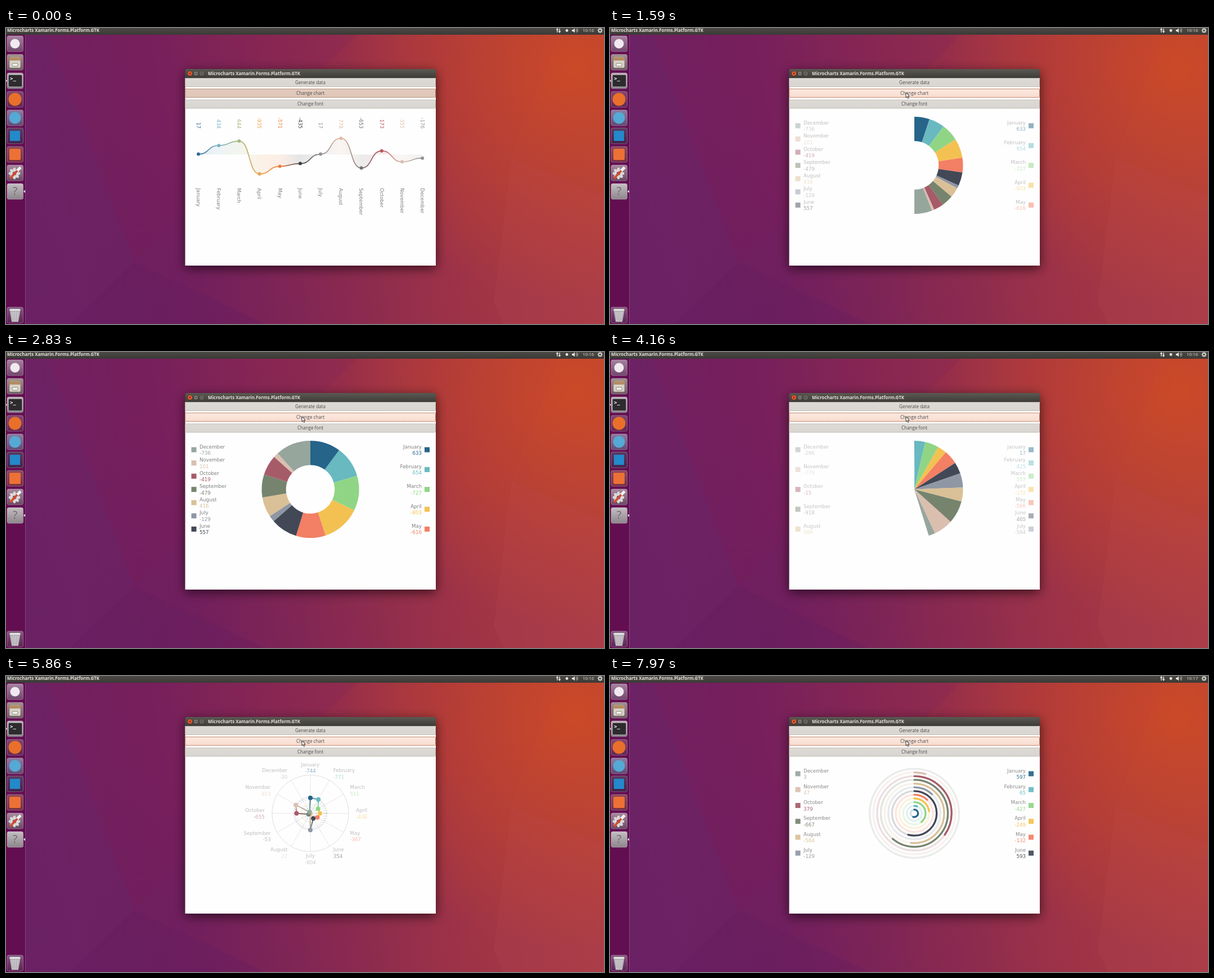
An HTML page with a canvas for the animation above (8 s loop, 1063 px wide and 527 px high).

```html
<!DOCTYPE html>
<html lang="en">
<head>
<meta charset="utf-8">
<title>Microcharts</title>
<style>
html, body { margin: 0; width: 100%; height: 100%; overflow: hidden; background: #6b1f5c; }
canvas { display: block; }
</style>
</head>
<body>
<canvas id="stage" width="1063" height="527"></canvas>
<script>
const W = 1063, H = 527, LOOP = 8000, TAU = Math.PI * 2;
const CX = 541, CY = 244.5, BAR = 12;
const UI = '"Open Sans", "Noto Sans", sans-serif';
const CHART_FONT = '8.7px "DejaVu Sans", sans-serif';
const MONTHS = ['January', 'February', 'March', 'April', 'May', 'June', 'July',
  'August', 'September', 'October', 'November', 'December'];
const COLORS = ['#266489', '#68b9c0', '#90d585', '#f3c151', '#f37f64', '#424856',
  '#8f97a4', '#dac096', '#76846e', '#a65b69', '#dabfaf', '#97a69d'];
const LINE_COLORS = ['#2c6a9c', '#7fb3c4', '#a6b881', '#e9a14c', '#ef7f42', '#3d3d44',
  '#929298', '#e1b9a2', '#707070', '#bc5660', '#d9bfb0', '#919498'];
const GREY = '#7e7e7e';

const CHARTS = [
  { start: -9999, draw: drawLine, values: [17, 434, 644, -935, -571, -435, 17, 778, -653, 173, -355, -176] },
  { start: 1294, draw: drawPie, hole: 43.3, right: 5, values: [633, 654, -727, -803, -616, 557, -129, 416, -479, -419, 101, -736] },
  { start: 3879, draw: drawPie, hole: 0, right: 7, values: [17, 425, 557, -372, -566, 465, -584, 566, -918, -15, -779, -266] },
  { start: 5560, draw: drawRadar, values: [-744, -771, 511, -438, -367, 354, -804, 27, -53, -655, 913, -30] },
  { start: 7120, draw: drawGauge, right: 6, values: [597, 65, -427, -249, -132, 593, -129, -564, -667, 379, 47, 3] }
];
const PRESSES = [[1190, 1290], [3830, 3879], [5390, 5550], [7040, 7120]];

const stage = document.getElementById('stage');
let ctx = stage.getContext('2d');

const clamp = x => Math.max(0, Math.min(1, x));
const easeOut = x => 1 - Math.pow(1 - clamp(x), 3);

function text(str, x, y, color, font = CHART_FONT, align = 'left') {
  ctx.font = font;
  ctx.textAlign = align;
  ctx.textBaseline = 'alphabetic';
  ctx.fillStyle = color;
  ctx.fillText(str, x, y + 3.2);
}

function box(x, y, w, h, fill, stroke, r = 0) {
  ctx.beginPath();
  ctx.roundRect(x, y, w, h, r);
  if (fill) { ctx.fillStyle = fill; ctx.fill(); }
  if (stroke) { ctx.strokeStyle = stroke; ctx.lineWidth = 1; ctx.stroke(); }
}

function disc(x, y, r, fill) {
  ctx.beginPath();
  ctx.arc(x, y, r, 0, TAU);
  ctx.fillStyle = fill;
  ctx.fill();
}

function path(points, fill, stroke, width = 1) {
  ctx.beginPath();
  points.forEach(([x, y]) => ctx.lineTo(x, y));
  if (fill) { ctx.closePath(); ctx.fillStyle = fill; ctx.fill(); }
  if (stroke) { ctx.strokeStyle = stroke; ctx.lineWidth = width; ctx.stroke(); }
}

function gradient(x0, y0, x1, y1, ...stops) {
  const g = ctx.createLinearGradient(x0, y0, x1, y1);
  stops.forEach((c, i) => g.addColorStop(i / (stops.length - 1), c));
  return g;
}

function glow(x, y, r, inner, outer) {
  const g = ctx.createRadialGradient(x, y, 0, x, y, r);
  g.addColorStop(0, inner);
  g.addColorStop(1, outer);
  ctx.fillStyle = g;
  ctx.fillRect(0, 0, W, H);
}

/* Desktop */

function drawWallpaper() {
  ctx.fillStyle = gradient(30, 300, 1063, 150, '#6c2163', '#75205e', '#8b2a50', '#a03446', '#aa3c46');
  ctx.fillRect(0, 0, W, H);
  glow(1010, 70, 420, 'rgba(208,76,34,.85)', 'rgba(208,76,34,0)');
  glow(330, 527, 420, 'rgba(92,26,94,.22)', 'rgba(92,26,94,0)');
  path([[34, 11], [75, 11], [228, 417], [115, 527], [34, 527]], 'rgba(106,36,102,.4)');
  path([[75, 11], [625, 11], [228, 417]], 'rgba(130,28,84,.12)');
  path([[228, 417], [115, 527], [460, 527]], 'rgba(92,28,96,.2)');
  path([[625, 11], [985, 11], [900, 233], [764, 180], [540, 90]], 'rgba(190,58,56,.08)');
  path([[900, 233], [868, 490], [885, 527], [1063, 527], [1063, 300]], 'rgba(185,75,85,.16)');
  path([[985, 11], [900, 233], [868, 490]], null, 'rgba(255,150,120,.06)');
}

function tile(y, top, bottom) {
  box(2, y - 14, 28.5, 28, gradient(0, y - 14, 0, y + 14, top, bottom), 'rgba(255,255,255,.28)', 3);
}

function drawLauncher() {
  ctx.fillStyle = 'rgba(96,8,76,.72)';
  ctx.fillRect(0, BAR, 34, H - BAR);
  ctx.fillStyle = 'rgba(255,255,255,.16)';
  ctx.fillRect(34, BAR, 1, H - BAR);

  tile(28, '#a5839f', '#71476c');
  disc(16, 28, 8.5, '#f1e9ef');

  tile(61, '#a28f92', '#6d5862');
  box(6, 51, 20, 20, '#d9d3c8', '#8c857b', 2);
  box(6, 52, 20, 6, '#b48d66');
  box(11, 63, 10, 5, '#f5f3ef', '#88837c', 1);

  tile(94, '#b9b0b6', '#77707a');
  box(4, 83, 25, 22, '#2d2b2e', '#d8d4d6', 2);
  text('>_', 7, 90, '#fff', 'bold 9px "DejaVu Sans Mono", monospace');

  tile(127, '#85466f', '#622752');
  disc(16, 127, 11.5, '#e8702a');
  tile(160, '#8f7ca0', '#624a74');
  disc(16, 160, 10.5, '#55a9d4');
  tile(192, '#5c3b62', '#40244b');
  box(7, 183, 18, 18, '#2489ca');
  tile(225, '#8e4a5b', '#753144');
  box(6, 215, 20, 20, '#ec7135', null, 2);

  tile(258, '#a98a9e', '#694a64');
  for (let i = 0; i < 8; i++) {
    const a = i * TAU / 8;
    disc(15 + 8 * Math.cos(a), 259 + 8 * Math.sin(a), 2.4, '#d9d9d9');
  }
  disc(15, 259, 7.8, '#d9d9d9');
  disc(15, 259, 3.2, '#77566f');
  path([[7, 268], [21, 253]], null, '#d54a30', 4);
  path([[20, 254], [26, 248]], null, '#f2f2f2', 5);

  tile(291, '#c4bfc2', '#8d858c');
  text('?', 16, 294, '#6f6970', '20px ' + UI, 'center');
  path([[34, 288.5], [34, 293.5], [31, 291]], '#eee');
  path([[0, 92], [0, 96], [2, 94]], '#eee');

  tile(511, '#85587f', '#592451');
  path([[7, 503], [25, 503], [22, 523], [10, 523]], '#d3d0d4');
  for (let i = 0; i < 5; i++) path([[9 + i * 3.3, 505], [11 + i * 2.5, 522]], null, '#9a949d');
  box(6, 500, 20, 4, '#eeeeee', '#918b92', 2);
}

function drawTopBar() {
  ctx.fillStyle = gradient(0, 0, 0, BAR, '#4b4944', '#3b3a36');
  ctx.fillRect(0, 0, W, BAR);
  const white = '#e8e5df';
  text('Microcharts Xamarin.Forms.Platform.GTK', 2, 3.8, white, 'bold 7.9px ' + UI);
  path([[980, 8], [980, 1]], null, white, 1.4);
  path([[977.5, 3.5], [980, 0], [982.5, 3.5]], white);
  path([[984, 1], [984, 8]], null, white, 1.4);
  path([[981.5, 5.5], [984, 9], [986.5, 5.5]], white);
  disc(997, 4.5, 2.4, white);
  path([[1006, 3], [1008, 3], [1011, 0.5], [1011, 8.5], [1008, 6], [1006, 6]], white);
  ctx.strokeStyle = white;
  ctx.lineWidth = 0.9;
  [2.5, 4.8].forEach(r => {
    ctx.beginPath();
    ctx.arc(1011.5, 4.5, r, -0.9, 0.9);
    ctx.stroke();
  });
  for (let i = 0; i < 8; i++) {
    const a = i * TAU / 8;
    path([[1056 + 2.5 * Math.cos(a), 4.5 + 2.5 * Math.sin(a)],
      [1056 + 4.5 * Math.cos(a), 4.5 + 4.5 * Math.sin(a)]], null, white, 1.3);
  }
  ctx.beginPath();
  ctx.arc(1056, 4.5, 2.5, 0, TAU);
  ctx.stroke();
}

function drawWindow() {
  ctx.save();
  ctx.shadowColor = 'rgba(0,0,0,.62)';
  ctx.shadowBlur = 20;
  ctx.shadowOffsetY = 5;
  box(318.5, 73, 445.5, 350, '#3c3b37', null, [4, 4, 0, 0]);
  ctx.restore();
  box(318.5, 73, 445.5, 16, gradient(0, 73, 0, 89, '#5b5952', '#3d3c38'), null, [4, 4, 0, 0]);
  ctx.fillStyle = '#fefefe';
  ctx.fillRect(318.5, 89, 445.5, 334);
  disc(327, 81, 4.6, '#31302c');
  disc(327, 81, 4, '#ea5a30');
  path([[325.4, 79.4], [328.6, 82.6]], null, '#5b2414');
  path([[328.6, 79.4], [325.4, 82.6]], null, '#5b2414');
  [337.5, 348].forEach(x => {
    disc(x, 81, 4.4, '#34332f');
    disc(x, 81, 3.7, '#7a7870');
  });
  path([[335.7, 81], [339.3, 81]], null, '#3c3b37');
  box(346.5, 79.5, 3, 3, null, '#3c3b37');
  text('Microcharts Xamarin.Forms.Platform.GTK', 359, 81, '#e4e0d8', 'bold 7.9px ' + UI);
  drawButton('Generate data', 89, '#dddad5', '#d9d5d0', '#c3beb7');
  drawButton('Change font', 127.5, '#dddad5', '#d9d5d0', '#c3beb7');
}

function drawButton(label, y, top, bottom, border) {
  box(318.8, y + 0.5, 444.7, 15, gradient(0, y, 0, y + 16, top, bottom), border, 1);
  text(label, CX, y + 7.7, '#4c4c4c', '500 8.1px ' + UI, 'center');
}

/* Charts */

function drawLegend(chart, p) {
  const row = (i, k, count, isRight) => {
    const y = 174 + 141.3 * k / (count - 1);
    const x = isRight ? 739 : 344, align = isRight ? 'right' : 'left';
    ctx.fillStyle = COLORS[i];
    ctx.fillRect(isRight ? 744 : 329.5, y - 4.5, 9, 9);
    text(MONTHS[i], x, y - 5.6, GREY, CHART_FONT, align);
    text(chart.values[i], x, y + 5.9, COLORS[i], CHART_FONT, align);
  };
  ctx.globalAlpha = p;
  for (let i = 0; i < 12; i++) {
    if (i < chart.right) row(i, i, chart.right, true);
    else row(i, 11 - i, 12 - chart.right, false);
  }
  ctx.globalAlpha = 1;
}

function drawLine({ values }) {
  const step = 36.2, bend = 20.3, origin = 225.2;
  const pts = values.map((v, i) => [342 + step * i, origin - v * 0.037]);
  const ramp = gradient(pts[0][0], 0, pts[11][0], 0, ...LINE_COLORS);
  const curve = () => {
    for (let i = 1; i < 12; i++) {
      const [x0, y0] = pts[i - 1], [x1, y1] = pts[i];
      ctx.bezierCurveTo(x0 + bend, y0, x1 - bend, y1, x1, y1);
    }
  };
  ctx.beginPath();
  ctx.moveTo(pts[0][0], origin);
  ctx.lineTo(...pts[0]);
  curve();
  ctx.lineTo(pts[11][0], origin);
  ctx.globalAlpha = 0.13;
  ctx.fillStyle = ramp;
  ctx.fill();
  ctx.globalAlpha = 1;
  ctx.beginPath();
  ctx.moveTo(...pts[0]);
  curve();
  ctx.strokeStyle = ramp;
  ctx.lineWidth = 1.7;
  ctx.stroke();
  pts.forEach(([x, y], i) => {
    disc(x, y, 3, LINE_COLORS[i]);
    sideways(values[i], x, 179, LINE_COLORS[i], 'right');
    sideways(MONTHS[i], x, 285, GREY, 'left');
  });
}

function sideways(str, x, y, color, align) {
  ctx.save();
  ctx.translate(x, y);
  ctx.rotate(TAU / 4);
  text(str, 0, 0, color, CHART_FONT, align);
  ctx.restore();
}

function drawPie(chart, p) {
  const total = chart.values.reduce((sum, v) => sum + Math.abs(v), 0);
  let from = -TAU / 4;
  chart.values.forEach((v, i) => {
    const to = from + Math.abs(v) / total * TAU * p;
    ctx.beginPath();
    ctx.arc(CX, CY, 86.5, from, to);
    ctx.arc(CX, CY, chart.hole, to, from, true);
    ctx.fillStyle = COLORS[i];
    ctx.fill();
    from = to;
  });
  drawLegend(chart, p);
}

function drawRadar({ values }, p) {
  const R = 68, low = Math.min(...values.map(Math.abs));
  const polar = (i, r) => [CX + r * Math.sin(i * TAU / 12), CY - r * Math.cos(i * TAU / 12)];
  const radii = values.map(v => R * Math.abs(v * p - low) / (1000 - low));
  const pts = radii.map((r, i) => polar(i, r));
  const ring = (r, color, width) => {
    ctx.beginPath();
    ctx.arc(CX, CY, r, 0, TAU);
    ctx.strokeStyle = color;
    ctx.lineWidth = width;
    ctx.stroke();
  };
  ring(R, '#dedede', 1);
  for (let i = 0; i < 12; i++) path([[CX, CY], polar(i, R)], null, '#e6e6e6');
  ctx.globalAlpha = 0.65 * p;
  ctx.setLineDash([1.5, 2.7]);
  radii.forEach((r, i) => ring(r, COLORS[i], 1.2));
  ctx.setLineDash([]);
  ctx.globalAlpha = 0.45 * p;
  pts.forEach((pt, i) => path([[CX, CY], pt], null, COLORS[i], 1.1));
  ctx.globalAlpha = 1;
  pts.forEach((a, i) => {
    const n = (i + 1) % 12, b = pts[n];
    path([a, b], null, gradient(...a, ...b, COLORS[i], COLORS[n]), 1.8);
  });
  pts.forEach((pt, i) => disc(...pt, 4, COLORS[i]));
  ctx.globalAlpha = p;
  values.forEach((v, i) => {
    const [x, y] = polar(i, 81.3);
    const align = i % 6 === 0 ? 'center' : i < 6 ? 'left' : 'right';
    text(MONTHS[i], x, y - 5.8, GREY, CHART_FONT, align);
    text(v, x, y + 5.8, COLORS[i], CHART_FONT, align);
  });
  ctx.globalAlpha = 1;
}

function drawGauge(chart, p) {
  const arc = (r, share, color, alpha) => {
    ctx.globalAlpha = alpha;
    ctx.beginPath();
    ctx.arc(CX, CY, r, -TAU / 4, -TAU / 4 + TAU * share);
    ctx.strokeStyle = color;
    ctx.stroke();
  };
  ctx.lineWidth = 3.3;
  chart.values.forEach((v, i) => {
    const r = (i + 1) * 6.62;
    ctx.lineCap = 'butt';
    arc(r, 1, COLORS[i], 0.2);
    // A stub shorter than its own cap stays invisible.
    const share = Math.abs(v) / 1000 * p;
    ctx.lineCap = 'round';
    if (share * TAU * r > ctx.lineWidth / 2) arc(r, share, COLORS[i], 1);
  });
  ctx.lineCap = 'butt';
  drawLegend(chart, p);
}

/* Pointer */

function pointerAt(t) {
  const k = easeOut((t - 70) / 730);
  return [974 - 448 * k, 517 - 402 * k];
}

function drawPointer(x, y) {
  path([[x, y], [x, y + 9], [x + 2, y + 7.2], [x + 3.6, y + 10.5], [x + 5, y + 9.8],
    [x + 3.5, y + 6.6], [x + 6.3, y + 6.4]], '#fff', '#222', 0.9);
}

function makeBackdrop() {
  const layer = document.createElement('canvas');
  layer.width = W;
  layer.height = H;
  const main = ctx;
  ctx = layer.getContext('2d');
  drawWallpaper();
  drawLauncher();
  drawTopBar();
  drawWindow();
  ctx = main;
  return layer;
}

function stepTime(t) {
  const [from, step] = t < 3812 ? [70, 76.67] : [3840, 77.9];
  return from + step * Math.floor((t - from) / step + 0.35);
}

const backdrop = makeBackdrop();

function render(now) {
  const t = stepTime(now % LOOP);
  ctx.drawImage(backdrop, 0, 0);
  text(t < 7600 ? '10:16' : '10:17', 1025, 3.8, '#e8e5df', '7.9px ' + UI);

  const [px, py] = pointerAt(t);
  const pressed = PRESSES.some(([a, b]) => t >= a && t < b);
  const hover = py < 124 && !pressed;
  if (hover) drawButton('Change chart', 108, '#fce9e0', '#f8dccf', '#c58a70');
  else drawButton('Change chart', 108, '#e2cabc', '#dfc6b8', '#b8927b');

  const chart = CHARTS.filter(c => c.start <= t).pop();
  chart.draw(chart, easeOut((t - chart.start) / 1500));
  if (t >= 70) drawPointer(px, py);
}

function loop() {
  render(performance.now());
  requestAnimationFrame(loop);
}
loop();
</script>
</body>
</html>
```
